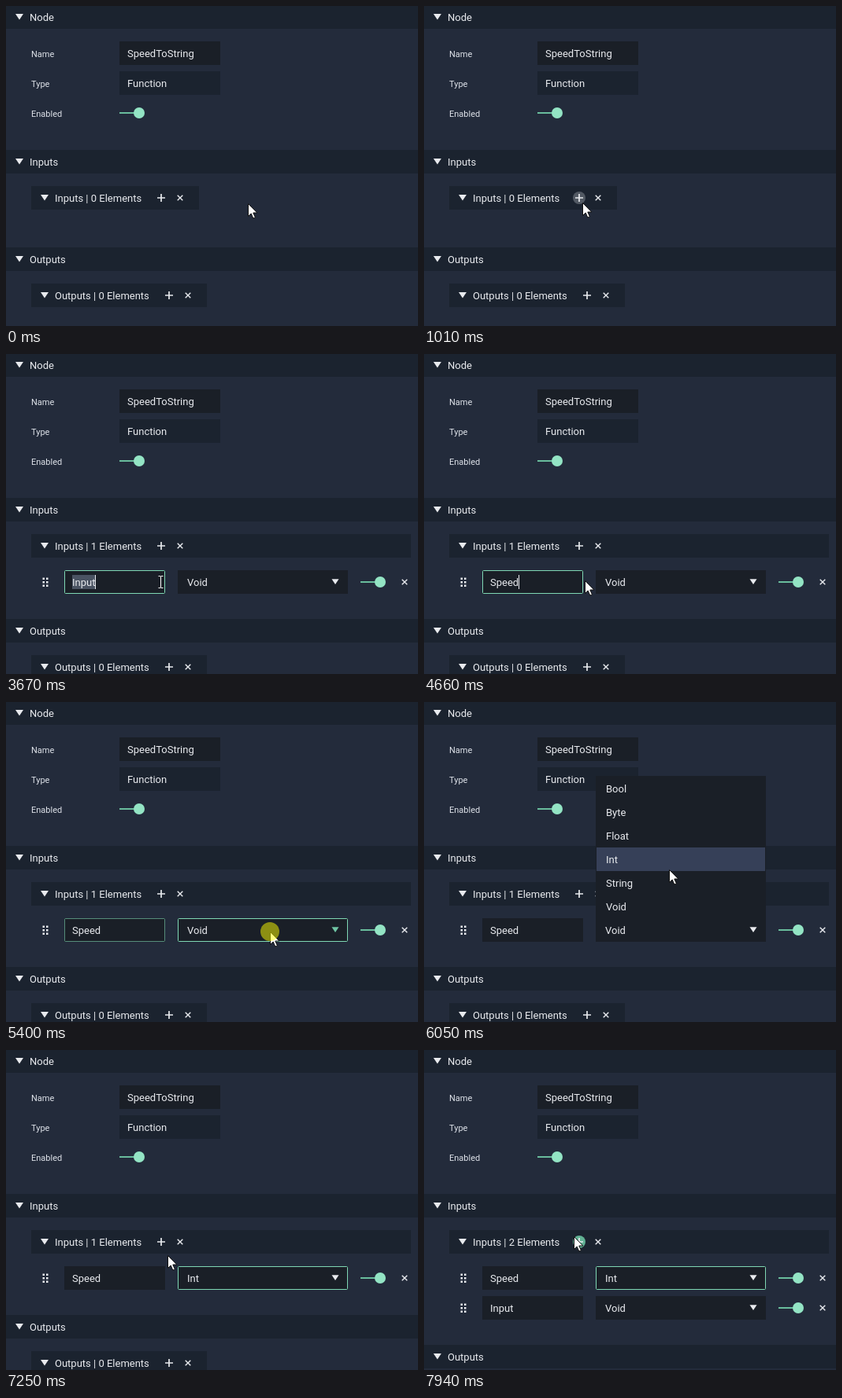
An HTML page for the animation above (7990 ms loop, 523 px wide and 407 px high).

```html
<!DOCTYPE html>
<html lang="en">
<head>
<meta charset="utf-8">
<title>Node inspector</title>
<style>
  html, body { margin: 0; width: 100%; height: 100%; overflow: hidden; background: #232b3b; }
  svg { display: block; width: 523px; height: 407px; }
  text { font: 13px Roboto, sans-serif; fill: #e8eaee; white-space: pre; }
  text.label { font-size: 11px; fill: #dde1e8; }
</style>
</head>
<body>
<svg id="stage" viewBox="0 0 523 407"></svg>
<script>
const LOOP = 7990;
const BG = '#232b3b', BAR = '#1b232f', BAR_HOVER = '#1e2735', FIELD = '#1a1f27';
const WHITE = '#e8eaee', GREEN = '#7fd8b4', KNOB = '#93e4c4';
const stage = document.getElementById('stage');

function add(parent, tag, attrs, content) {
  const node = document.createElementNS('http://www.w3.org/2000/svg', tag);
  set(node, attrs);
  if (content !== undefined) node.textContent = content;
  parent.append(node);
  return node;
}
function set(node, attrs) {
  for (const key in attrs) node.setAttribute(key, attrs[key]);
}
const show = (node, on) => node.setAttribute('visibility', on ? 'visible' : 'hidden');
const group = parent => add(parent, 'g', {});
const rect = (parent, x, y, width, height, fill) => add(parent, 'rect', { x, y, width, height, fill });
const label = (parent, x, y, content, cls = '') => add(parent, 'text', { x, y, class: cls }, content);
const path = (parent, d, attrs) => add(parent, 'path', { d, ...attrs });
const line = (parent, d, width = 1.5) => path(parent, d, { stroke: WHITE, 'stroke-width': width, fill: 'none' });
const outline = (parent, x, y, w, h) => add(parent, 'rect',
  { x: x + .5, y: y + .5, width: w - 1, height: h - 1, rx: 1, fill: 'none', stroke: GREEN });
const triangle = (parent, x, y, r = 5) =>
  path(parent, `M${x - r} ${y - r * .7}h${2 * r}l${-r} ${r * 1.5}z`, { fill: WHITE });
const cross = (parent, x, y) => line(parent, `M${x - 3.3} ${y - 3.3}l6.6 6.6m0 -6.6l-6.6 6.6`, 1.4);

function toggle(parent, x, y) {
  rect(parent, x, y - 1, 20, 2, '#69bd9d');
  add(parent, 'circle', { cx: x + 25, cy: y, r: 7, fill: KNOB });
}
function header(parent, y, title) {
  const bar = rect(parent, 0, y, 523, 30, BAR);
  triangle(parent, 17, y + 14.5);
  label(parent, 30, y + 20, title);
  return bar;
}
function listBar(parent, y, title, plusX) {
  const bar = rect(parent, 32, y, plusX + 48 - 32, 30, BAR);
  triangle(parent, 49, y + 14.5);
  const text = label(parent, 62, y + 20, title);
  const halo = add(parent, 'circle', { cx: plusX, cy: y + 15, r: 8, fill: 'none' });
  line(parent, `M${plusX - 5} ${y + 15}h10m-5 -5v10`, 1.7);
  cross(parent, plusX + 24, y + 15);
  return { bar, text, halo };
}
function row(y) {
  const g = group(stage);
  for (let i = 0; i < 6; i++) rect(g, 46.5 + i % 2 * 4.5, y + 9.5 + (i >> 1) * 4.5, 2.5, 2.5, WHITE);
  rect(g, 74, y, 128, 30, FIELD);
  const mark = rect(g, 84, y + 6, 30, 18, '#4a5362');
  const name = label(g, 84, y + 20, 'Input');
  rect(g, 218, y, 216, 30, FIELD);
  const type = label(g, 230, y + 20, 'Void');
  const arrow = triangle(g, 418, y + 14.5, 4.5);
  toggle(g, 450, y + 15);
  cross(g, 506, y + 15);
  show(mark, false);
  return { g, mark, name, type, arrow };
}

// Static panel
rect(stage, 0, 0, 523, 407, BG);
header(stage, -1, 'Node');
label(stage, 32, 65, 'Name', 'label');
label(stage, 32, 103, 'Type', 'label');
label(stage, 32, 141, 'Enabled', 'label');
rect(stage, 144, 45, 128, 30, FIELD);
rect(stage, 144, 83, 128, 30, BAR);
label(stage, 154, 65, 'SpeedToString');
label(stage, 154, 103, 'Function');
toggle(stage, 144, 136);

// Changing parts
const inputsHeader = header(stage, 183, 'Inputs');
const inputs = listBar(stage, 229, 'Inputs | 0 Elements', 197);
const rows = [row(275), row(313)];
const nameFocus = outline(stage, 74, 275, 128, 30);
const typeFocus = outline(stage, 218, 275, 216, 30);
const caret = rect(stage, 114, 281, 1, 18, WHITE);
const outputs = group(stage);
header(outputs, 307, 'Outputs');
listBar(outputs, 353, 'Outputs | 0 Elements', 207);

const menu = group(stage);
rect(menu, 218, 94, 216, 182, FIELD);
const menuHover = rect(menu, 219, 185, 214, 30, '#364058');
['Bool', 'Byte', 'Float', 'Int', 'String', 'Void'].forEach((name, i) => label(menu, 231, 115 + 30 * i, name));

const pointer = path(stage, 'M.5 .5v16l3.7 -3.5l2.6 6l2.6 -1.1l-2.6 -5.9h5z',
  { fill: '#fff', stroke: '#111', 'stroke-width': 1 });
const beam = group(stage);
path(beam, 'M-3 -7.5h2.5l.5 .5l.5 -.5h2.5M0 -7v14M-3 7.5h2.5l.5 -.5l.5 .5h2.5',
  { stroke: '#fff', fill: 'none' });
const clickSpot = add(stage, 'circle', { r: 12, fill: '#ff0', 'fill-opacity': .5 });

// Pointer moves: start, end, control x, y, goal x, y
const START = [307, 251];
const MOVES = [
  [480, 1090, 250, 259, 196, 249],
  [1230, 1270, 195, 248, 195, 248],
  [2040, 2450, 174, 270, 188, 283],
  [3160, 3310, 193, 286, 196.5, 290],
  [3670, 3840, 200, 290, 204, 288],
  [4640, 5340, 270, 352, 335, 292],
  [5800, 6050, 320, 250, 311, 213],
  [6050, 6250, 311, 205, 315, 204],
  [6770, 7250, 270, 325, 205, 261],
  [7250, 7630, 193, 244, 190, 237]
];
const CLICKS = [[1700, 1840], [2700, 2840], [5380, 5480], [6400, 6510], [7800, 7940]];
const TYPING = [[0, 'Input'], [3930, 'S'], [4050, 'Sp'], [4160, 'Spe'], [4280, 'Spee'], [4460, 'Speed']];

const between = (t, a, b) => t >= a && t < b;
const ramp = (t, a, b) => Math.min(1, Math.max(0, (t - a) / (b - a)));
const ease = u => u * u * (3 - 2 * u);

function pointerAt(t) {
  let [x, y] = START;
  for (const [from, to, cx, cy, gx, gy] of MOVES) {
    if (t < from) break;
    const u = ease(ramp(t, from, to)), v = 1 - u;
    x = v * v * x + 2 * u * v * cx + u * u * gx;
    y = v * v * y + 2 * u * v * cy + u * u * gy;
  }
  return [x, y];
}

function render(t) {
  const [x, y] = pointerAt(t);
  const count = (t >= 1840) + (t >= 7940);
  const menuOpen = between(t, 5450, 6510);
  const inside = (l, top, w, h) => between(x, l, l + w) && between(y, top, top + h);

  const barWidth = count ? 482 : 213;
  const onPlus = Math.hypot(x - 197, y - 244) < 11;
  const onBar = !menuOpen && !onPlus && inside(32, 229, barWidth, 30);
  set(inputs.bar, { width: barWidth, fill: onBar ? BAR_HOVER : BAR });
  set(inputsHeader, { fill: !menuOpen && inside(0, 183, 523, 30) ? BAR_HOVER : BAR });
  inputs.text.textContent = `Inputs | ${count} Elements`;
  const pressed = between(t, 1700, 1980) || t >= 7800;
  set(inputs.halo, { fill: pressed ? '#62b294' : onPlus ? '#525963' : 'none' });

  rows.forEach((r, i) => set(r.g, { display: i < count ? 'inline' : 'none' }));
  outputs.setAttribute('transform', `translate(0 ${[0, 30, 68][count]})`);

  const [first] = rows;
  first.name.textContent = TYPING.filter(step => t >= step[0]).pop()[1];
  first.type.textContent = t < 6510 ? 'Void' : 'Int';
  set(first.arrow, { fill: between(t, 5300, 5450) ? '#70c5a4' : WHITE });
  show(first.mark, between(t, 2840, 3930));
  show(caret, between(t, 2840, 5340));
  if (count) set(caret, { x: Math.round(84 + first.name.getComputedTextLength()) });

  set(nameFocus, { opacity: ramp(t, 2700, 2840) * (1 - ramp(t, 5340, 5490)) });
  show(typeFocus, between(t, 5340, 5450) || t >= 6510);

  set(menu, { display: menuOpen ? 'inline' : 'none' });
  set(menuHover, {
    y: 95 + 30 * Math.floor((y - 95) / 30),
    opacity: inside(218, 95, 216, 180) ? 1 : 0
  });

  const editing = count > 0 && inside(74, 275, 128, 30);
  show(pointer, !editing);
  show(beam, editing);
  const place = `translate(${Math.round(x)} ${Math.round(y)})`;
  set(pointer, { transform: place });
  set(beam, { transform: `translate(${Math.floor(x) + .5} ${Math.round(y)})` });
  set(clickSpot, { transform: place });
  show(clickSpot, CLICKS.some(([a, b]) => between(t, a, b)));
}

function tick() {
  render(performance.now() % LOOP);
  requestAnimationFrame(tick);
}
tick();
</script>
</body>
</html>
```
